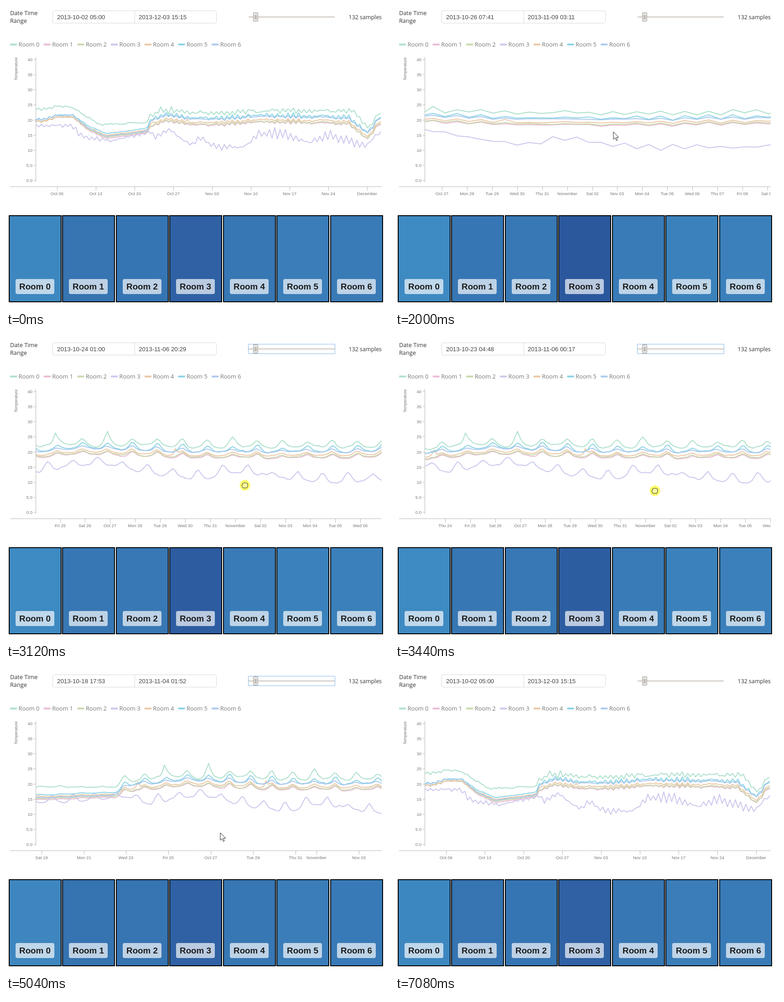
Animation, 840 px wide and 667 px high, one loop 7.12 s. Source, as an HTML page with a canvas:

```html
<!DOCTYPE html>
<html lang="en">
<head>
<meta charset="utf-8">
<title>Room temperatures</title>
<style>
html, body { margin: 0; width: 100%; height: 100%; overflow: hidden; background: #fff; }
canvas { display: block; }
</style>
</head>
<body>
<canvas id="stage" width="840" height="667"></canvas>
<script>
const ctx = document.getElementById('stage').getContext('2d');
const LOOP = 7120, STEP = 40;
const LEFT = 66, RIGHT = 824, TOP = 112, BOTTOM = 429;
const SANS = '"Liberation Sans", Arial, sans-serif';
const UI = '"Open Sans", "Noto Sans", sans-serif';

// Times are days counted from 1 October 2013.
const FULL = [1.2084, 62.4271], SPAN = 13.8122, ZOOM = 25.3205, PAN_END = 18.65;

// Slow temperature trends as [day, degrees] key points.
const WARM = { seed: 11, rough: 0.5, keys: [[1, 23.3], [6, 24.4], [8, 24], [13, 18.3], [21.5, 19.1],
  [22, 21.5], [24, 23.1], [34, 22.2], [39, 23], [58, 23], [59, 22.3], [61, 17.8], [62, 18.2], [63, 21.7]] };
const COMMON = { seed: 23, rough: 0.3, keys: [[1, 19.5], [3, 19.3], [5, 20.8], [8, 21], [11, 16.6], [14, 14.2],
  [21.5, 15.9], [22, 18], [25, 19.7], [28, 18.7], [35, 18.4], [42, 19.5], [58, 18.8], [61, 14], [62, 14.8], [63, 18.5]] };
const COOL = { seed: 37, rough: 0.6, keys: [[1, 18.1], [8, 18.1], [9.5, 14.5], [15, 13], [22, 16], [23.2, 14.2],
  [25.5, 17], [29.3, 11.5], [31, 14], [35, 10.6], [39, 11], [42, 15.5], [46.5, 15.5], [50, 12.4],
  [54.5, 15], [61, 11], [63, 15.5]] };

// offset and swing hold values for early, unheated and heated weeks.
const rooms = [
  { color: '#a5ddc5', trend: WARM, offset: [0, 0, 0], swing: [0.7, 0.3, 1.5], peak: 0.88, spikes: [23.8, 25.88] },
  { color: '#e7b5d1', trend: COMMON, offset: [0, -0.4, -0.2], swing: [0.5, 0.2, 0.9], peak: 0.9 },
  { color: '#c4d5a4', trend: COMMON, offset: [0.1, 0, 0], swing: [0.6, 0.2, 0.9], peak: 0.88 },
  { color: '#c7c1ec', trend: COOL, offset: [0, 0, 0], swing: [1.8, 1.4, 1.8], peak: 0.5, late: 2 },
  { color: '#e8c19c', trend: COMMON, offset: [0, 0.6, 0.6], swing: [0.6, 0.2, 0.9], peak: 0.87, spikes: [22.55, 28.6] },
  { color: '#7fcfe1', trend: COMMON, offset: [0.7, 1.2, 2.1], swing: [0.7, 0.2, 1.5], peak: 0.9 },
  { color: '#a4c5ec', trend: COMMON, offset: [0.6, 0.3, 1.7], swing: [0.7, 0.2, 0.8], peak: 0.86 }
];

const clamp = u => Math.max(0, Math.min(1, u));
const lerp = (a, b, u) => a + (b - a) * u;
const rand = n => { const s = Math.sin(n * 12.9898) * 43758.5453; return s - Math.floor(s); };
const season = ([a, b, c], d) => d < 15 ? lerp(a, b, clamp((d - 8) / 4)) : lerp(b, c, clamp((d - 21.4) / 0.8));

function along(keys, d) {
  let i = 0;
  while (i < keys.length - 2 && d >= keys[i + 1][0]) i++;
  const [a, b] = [keys[i], keys[i + 1]];
  return lerp(a[1], b[1], clamp((d - a[0]) / (b[0] - a[0])));
}

// Smooth seeded noise from -1 to 1, with one knot per half day.
function wobble(seed, d) {
  const i = Math.floor(d * 2);
  return 2 * lerp(rand(i + seed * 131), rand(i + 1 + seed * 131), d * 2 - i) - 1;
}

function temperature(room, id, d) {
  const { trend, peak, spikes = [], late = 1 } = room;
  const phase = d - peak;
  const cycle = (Math.exp(1.5 * Math.cos(phase * 2 * Math.PI)) - 1.65) / 2.83;
  const vary = 0.6 + 0.8 * rand(Math.floor(phase + 0.5) + trend.seed * 71);
  const swing = season(room.swing, d) * lerp(1, late, clamp((d - 38) / 2));
  const calm = season([0.7, 0.4, 1], d);
  const noise = wobble(trend.seed, d) + 0.5 * wobble(id, d) + 0.6 * (rand(Math.floor(d * 9.6) + id * 997) - 0.5);
  const spike = spikes.reduce((sum, s) => sum + 2 * Math.exp(-(((d - s) / 0.08) ** 2)), 0);
  return along(trend.keys, d) + season(room.offset, d) + swing * vary * cycle + trend.rough * calm * noise + spike;
}

function sample(room, id, step, width) {
  const out = [];
  for (let d = FULL[0]; d < 63.56; d += step) {
    let sum = 0;
    for (let k = 0; k < width; k++) sum += temperature(room, id, d + k * 0.1);
    out.push([d, sum / width]);
  }
  return out;
}
const coarse = rooms.map((r, i) => sample(r, i, 0.479, 5));
const fine = rooms.map((r, i) => sample(r, i, 0.10417, 1));

// Each move is [begin, end, ...values]; the last position holds between moves.
function glide(from, moves, t) {
  return moves.reduce((at, [t0, t1, ...to]) => {
    const u = clamp((t - t0) / (t1 - t0));
    return at.map((v, k) => lerp(v, to[k], u));
  }, from);
}
const panMoves = [[2880, 3120, 23.0417], [3120, 3440, 22.2], [3680, 4040, 19.4677], [4040, 4240, PAN_END]];
const mouseMoves = [[160, 880, 351, 228], [880, 920, 359, 239], [920, 1320, 526, 276], [1840, 2000, 479, 276],
  [2600, 2720, 358, 320], [2880, 3120, 524, 323], [3120, 3440, 570, 335], [3440, 3640, 295, 358],
  [3680, 4040, 445, 364], [4040, 4240, 490, 364], [4240, 4280, 273, 362], [4320, 4640, 470, 357],
  [5960, 6000, 507, 366], [6320, 6560, 560, 690]];

function view(t) {
  if (t < 1480 || t >= 5360) return FULL;
  if (t < 5040) return [glide([ZOOM], panMoves, t)[0], SPAN];
  const span = SPAN * Math.pow(FULL[1] / SPAN, (t - 5000) / 360);
  return [lerp(PAN_END, FULL[0], (span - SPAN) / (FULL[1] - SPAN)), span];
}

function text(s, x, y, font, color, align = 'left') {
  ctx.font = font;
  ctx.fillStyle = color;
  ctx.textAlign = align;
  ctx.fillText(s, x, y);
}
function line(x1, y1, x2, y2, color, width = 1) {
  ctx.strokeStyle = color;
  ctx.lineWidth = width;
  ctx.beginPath();
  ctx.moveTo(x1, y1);
  ctx.lineTo(x2, y2);
  ctx.stroke();
}
function box(x, y, w, h, r, fill, stroke) {
  ctx.beginPath();
  ctx.roundRect(x, y, w, h, r);
  if (fill) { ctx.fillStyle = fill; ctx.fill(); }
  if (stroke) { ctx.strokeStyle = stroke; ctx.lineWidth = 1; ctx.stroke(); }
}
function clip(x, y, w, h) {
  ctx.save();
  ctx.beginPath();
  ctx.rect(x, y, w, h);
  ctx.clip();
}

const toY = v => 382 - v * 6.625;
const dateOf = d => new Date(Date.UTC(2013, 9, 1) + Math.floor(d * 1440) * 60000);
const stamp = d => dateOf(d).toISOString().slice(0, 16).replace('T', ' ');

function tickLabel(date) {
  const part = o => date.toLocaleString('en-US', { timeZone: 'UTC', ...o });
  const n = date.getUTCDate();
  if (n === 1) return part({ month: 'long' });
  const name = date.getUTCDay() === 0 ? part({ month: 'short' }) : part({ weekday: 'short' });
  return name + ' ' + String(n).padStart(2, '0');
}

function drawHeader(start, span, focused) {
  text('Date Time', 9, 20, '12.7px ' + UI, '#333');
  text('Range', 9, 37, '12.7px ' + UI, '#333');
  box(102.5, 10.5, 359, 27, 3, '#fff', '#d9d9d9');
  line(282.5, 10, 282.5, 38, '#d9d9d9');
  text(stamp(start), 112, 28.5, '13.33px ' + SANS, '#444');
  text(stamp(start + span), 291, 28.5, '13.33px ' + SANS, '#444');

  box(532, 22, 189, 4, 1, '#e0dcd8');
  box(542.5, 14.5, 10, 19, 1, '#e4e2df', '#a5a19d');
  for (const y of [21.5, 24.5, 27.5]) line(545, y, 550, y, '#77736f');
  if (focused) box(531.5, 13.5, 190, 21, 0, null, '#8ab9e8');
  text('132 samples', 824, 28.5, '12.4px ' + UI, '#333', 'right');
}

function drawAxes(start, span, toX) {
  const axis = '#b8b8b4', label = '#777', font = '9.5px ' + SANS;
  rooms.forEach((room, i) => {
    const x = 9 + i * 73.7;
    ctx.globalAlpha = 0.9;
    line(x, 84.5, x + 15, 84.5, room.color, 4);
    ctx.globalAlpha = 1;
    text('Room ' + i, x + 18.5, 89, '12.8px ' + UI, label);
  });
  ctx.save();
  ctx.translate(25, 138);
  ctx.rotate(-Math.PI / 2);
  text('Temperature', 0, 0, '9px ' + SANS, label, 'center');
  ctx.restore();

  line(65.5, TOP, 65.5, 386, axis);
  for (let v = 0; v <= 40; v += 5) {
    const y = Math.round(toY(v));
    line(61, y + 0.5, 65, y + 0.5, axis);
    text(v < 10 ? v.toFixed(1) : v, 58, y + 3.5, font, label, 'right');
  }

  clip(9, 390, RIGHT - 9, 40);
  line(9, 396.5, RIGHT, 396.5, axis);
  const gap = span / 10;
  for (let d = Math.ceil(start); d <= start + span; d++) {
    const date = dateOf(d);
    if (gap > 3.74 ? date.getUTCDay() !== 0 : gap > 1.42 && date.getUTCDate() % 2 === 0) continue;
    const x = Math.round(toX(d));
    line(x + 0.5, 397, x + 0.5, 405, axis);
    text(tickLabel(date), x, 415, font, label, 'center');
  }
  ctx.restore();
}

function drawSeries(data, toX) {
  clip(LEFT, TOP, RIGHT - LEFT, 274);
  ctx.lineWidth = 2;
  ctx.lineJoin = 'round';
  ctx.globalAlpha = 0.9;
  data.forEach((points, i) => {
    ctx.strokeStyle = rooms[i].color;
    ctx.beginPath();
    for (const [d, v] of points) ctx.lineTo(toX(d), toY(v));
    ctx.stroke();
  });
  ctx.restore();
}

// Tiles are tinted by the mean temperature in view.
function drawTiles(data, start, span) {
  data.forEach((points, i) => {
    const seen = points.filter(p => p[0] >= start && p[0] <= start + span);
    const above = seen.reduce((sum, p) => sum + p[1], 0) / seen.length - 12.8;
    const rgb = [44 + 1.9 * above, 90 + 4.95 * above, 159 + 3.6 * above].map(Math.round);
    const x = Math.floor(6 + i * 117.5);
    ctx.fillStyle = '#000';
    ctx.fillRect(x, 459, 116, 191);
    ctx.fillStyle = `rgb(${rgb})`;
    ctx.fillRect(x + 2, 461, 112, 187);
    box(x + 15, 599, 85, 33, 4, 'rgba(255,255,255,.67)');
    text('Room ' + i, x + 57.5, 622, 'bold 18.8px ' + SANS, '#1b1c1d', 'center');
  });
}

function drawLoader(t) {
  ctx.fillStyle = 'rgba(0,0,0,.34)';
  ctx.fillRect(9, 76, RIGHT - 9, BOTTOM - 76);
  const a = 1.3 + (t - 2320) / 600 * 2 * Math.PI;
  ctx.strokeStyle = '#fff';
  ctx.lineWidth = 2;
  ctx.beginPath();
  ctx.arc(416.5, 249, 18.5, a, a + 1.5);
  ctx.stroke();
}

const ARROW = new Path2D('M0 0V16.5L3.8 13L6.4 19L9 18L6.5 12.2H11.5Z');
const HAND = new Path2D('M-4 6L-7 1Q-7 -1 -5 -1V-4Q-4 -6 -2.5 -4.5Q-1 -7 0.5 -5Q2.5 -6.5 3.5 -4.2Q6 -5 6 -2.5V2L4 6Z');

function drawMouse(x, y, pressed, hand) {
  ctx.save();
  ctx.translate(x, y);
  if (pressed) {
    ctx.fillStyle = 'rgba(255,255,0,.58)';
    ctx.beginPath();
    ctx.arc(0, 0, 11.5, 0, 2 * Math.PI);
    ctx.fill();
  }
  const shape = hand ? HAND : ARROW;
  ctx.fillStyle = hand ? '#ffffa0' : '#fff';
  ctx.fill(shape);
  ctx.strokeStyle = '#222';
  ctx.lineWidth = 1;
  ctx.stroke(shape);
  ctx.restore();
}

function draw(t) {
  const within = (a, b) => t >= a && t < b;
  const [start, span] = view(t);
  const toX = d => LEFT + (d - start) / span * (RIGHT - LEFT);
  const data = within(2280, 6320) ? fine : coarse;
  const [mx, my] = glide([718, 667], mouseMoves, t);

  ctx.fillStyle = '#fff';
  ctx.fillRect(0, 0, 840, 667);
  drawHeader(start, span, within(2760, 7080));
  drawAxes(start, span, toX);
  drawSeries(data, toX);
  drawTiles(data, start, span);
  if (within(920, 1480)) {
    ctx.fillStyle = 'rgba(128,128,128,.3)';
    ctx.fillRect(359, TOP, mx - 359, BOTTOM - TOP);
  }
  if (within(2080, 2360) || within(6080, 6360)) drawLoader(t);
  if (within(200, 6560)) {
    const panning = within(2760, 3480) || within(3640, 4280);
    drawMouse(mx, my, panning || within(920, 1520), panning);
  }
}

const begin = performance.now();
function tick() {
  const t = (performance.now() - begin) % LOOP;
  draw(Math.floor(t / STEP) * STEP);
  requestAnimationFrame(tick);
}
tick();
</script>
</body>
</html>
```
